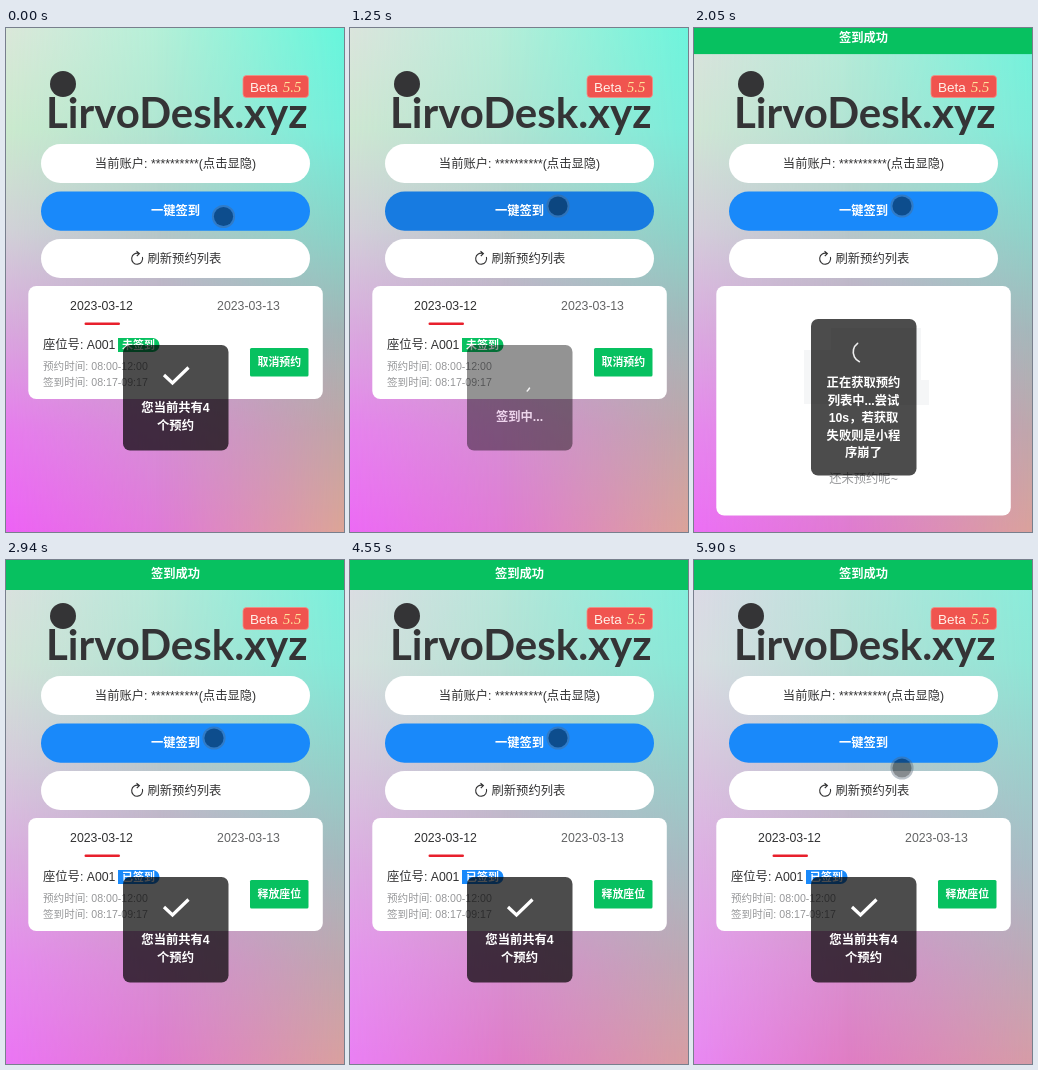
Write an HTML page that moves like this. It is 338 px wide and 504 px high and loops after 5.93 s.

```html
<!DOCTYPE html>
<html lang="zh-CN">
<head>
<meta charset="utf-8">
<title>签到</title>
<style>
  html, body { margin: 0; width: 100%; height: 100%; overflow: hidden; }
  div, svg { position: absolute; left: 0; top: 0; width: 338px; height: 504px; }
  #middle { -webkit-mask-image: linear-gradient(90deg, transparent, #000 45%); mask-image: linear-gradient(90deg, transparent, #000 45%); }
  #right { -webkit-mask-image: linear-gradient(90deg, transparent 45%, #000); mask-image: linear-gradient(90deg, transparent 45%, #000); }
  text { font: 12.3px "Liberation Sans", "Noto Sans CJK SC", "Noto Sans CJK", sans-serif; fill: #323233; white-space: pre; }
  .mid { text-anchor: middle; }
  .light { fill: #fff; font-weight: 700; }
  .soft { fill: #969799; }
  .small { font-size: 10.6px; }
  .brand { font: 700 42px Lato, sans-serif; fill: #343436; }
</style>
</head>
<body>
<div id="left"></div>
<div id="middle"></div>
<div id="right"></div>
<svg viewBox="0 0 338 504">
  <circle cx="57" cy="56" r="13" fill="#343436"/>
  <text class="brand" x="40" y="100">LirvoDesk.xyz</text>
  <rect x="237" y="47.5" width="65.5" height="22" rx="3.5" fill="#f0544f" stroke="#f58d84" stroke-width=".8"/>
  <text x="244" y="63.5" style="font-size:13.5px;fill:#fff0e8">Beta</text>
  <text x="277" y="64" style="font:italic 14.5px 'Liberation Serif',serif;fill:#ffe39a">5.5</text>

  <rect x="35" y="116" width="269" height="39" rx="19.5" fill="#fff"/>
  <text class="mid" x="169.5" y="139.5">当前账户: **********(点击显隐)</text>
  <rect id="sign" x="35" y="163.5" width="269" height="39.3" rx="19.6"/>
  <text class="mid light" x="169.5" y="187.3">一键签到</text>
  <rect x="35" y="211" width="269" height="39" rx="19.5" fill="#fff"/>
  <path d="M133 225.5A5.5 5.5 0 1 0 136.4 229M130.5 223.2L133.4 225.6L130.8 228" fill="none" stroke="#323233" stroke-width="1.1"/>
  <text x="141.5" y="234.7">刷新预约列表</text>

  <rect id="card" x="22.3" y="258" width="294.5" rx="8" fill="#fff"/>
  <g id="list">
    <text class="mid" x="95.5" y="282">2023-03-12</text>
    <text class="mid" x="242.5" y="282" style="fill:#646566">2023-03-13</text>
    <rect x="78.5" y="294.6" width="35.5" height="2.4" rx="1.2" fill="#e8202c"/>
    <text x="37" y="321.3">座位号: A001</text>
    <path id="tag" d="M112 310H146.5A7 7 0 0 1 146.5 324H112Z"/>
    <text id="tagText" class="light" x="116" y="321" style="font-size:11px"></text>
    <text class="soft small" x="37" y="342">预约时间: 08:00-12:00</text>
    <text class="soft small" x="37" y="358">签到时间: 08:17-09:17</text>
    <rect x="244" y="320" width="58.5" height="28.5" rx="1.5" fill="#07c160"/>
    <text id="action" class="mid light" x="273.3" y="338" style="font-size:10.9px"></text>
  </g>
  <g id="empty">
    <path d="M110 322H140V376H110ZM137 300H227V352H235V377H137Z" fill="#f5f6f7"/>
    <text class="mid soft" x="169.5" y="455">还未预约呢~</text>
  </g>

  <g id="toast">
    <rect id="box" x="117" width="105.5" rx="7" fill="#000" fill-opacity=".7"/>
    <path id="check" d="M158 347L166.5 355L182.5 339.5" fill="none" stroke="#fff" stroke-width="3.2"/>
    <circle id="spin" cx="170" r="10.8" fill="none" stroke="#eee" stroke-width="1.6" stroke-linecap="round"/>
    <g id="message"></g>
  </g>

  <g id="cursor">
    <circle r="10.6" fill="none" stroke="#567" stroke-opacity=".4" stroke-width="2"/>
    <circle r="9.6" fill="#000a14" fill-opacity=".47"/>
  </g>
  <g id="notify">
    <rect width="338" height="30" fill="#07c160"/>
    <text class="mid light" x="169.5" y="18.2">签到成功</text>
  </g>
</svg>
<script>
const LOOP = 5930, SIGNING = 1130, LOADING = 1700, DONE = 2330;
const $ = id => document.getElementById(id);
const set = (id, attrs) => { for (const k in attrs) $(id).setAttribute(k, attrs[k]); };
const show = (id, on) => $(id).style.display = on ? '' : 'none';
const progress = (t, start, length) => Math.min(1, Math.max(0, (t - start) / length));
const smooth = p => .5 - .5 * Math.cos(Math.PI * p);
const mix = (a, b, p) => a + (b - a) * p;

// Column colours from top to bottom, at the start and the end of the loop
const columns = {
  left: ['dbe8da cbeace d2d2d8 d9a8de e77cee ee62f6', 'ddd9e7 d9dde2 dac6e0 dfaee5 e69aee e988f4'],
  middle: ['b5f0d8 b0e6d2 b5c8c8 c6a8c8 d68ed6 e07ad8', 'b8e6dc b6e0d6 bcc8ce c8aac8 d890ce e07cc4'],
  right: ['66f6dc 74eedb 86d5c8 a2b5b5 c0a5a5 dca596', '88eedb 8ee6d6 9bd0cc a8bcc4 bea8b6 d69ca6']
};
const rgb = hex => [0, 2, 4].map(i => parseInt(hex.slice(i, i + 2), 16));
const palettes = Object.entries(columns).map(([id, ends]) => [id, ends.map(s => s.split(' ').map(rgb))]);

const toasts = {
  done: { top: 317, height: 105.5, first: 384, lines: ['您当前共有4', '个预约'] },
  signing: { top: 317, height: 105.5, first: 393, spin: 355, start: SIGNING, lines: ['签到中...'] },
  loading: { top: 291, height: 156.5, first: 359, spin: 324, start: LOADING,
    lines: ['正在获取预约', '列表中...尝试', '10s，若获取', '失败则是小程', '序崩了'] }
};
let phase;

function setPhase(name, signed) {
  const key = name + signed;
  if (key === phase) return;
  phase = key;
  const toast = toasts[name], empty = name === 'loading';
  set('box', { y: toast.top, height: toast.height });
  $('message').innerHTML = toast.lines.map((line, i) =>
    `<text class="mid light" x="169.5" y="${toast.first + i * 17.5}">${line}</text>`).join('');
  show('check', name === 'done');
  show('spin', name !== 'done');
  show('list', !empty);
  show('empty', empty);
  set('card', { height: empty ? 229.5 : 113 });
  set('tag', { fill: signed ? '#1989fa' : '#07c160' });
  $('tagText').textContent = signed ? '已签到' : '未签到';
  $('action').textContent = signed ? '释放座位' : '取消预约';
}

function spin(toast, t) {
  const age = t - toast.start, half = age % 1500 / 750, unit = .54;
  const grow = smooth(Math.min(half, 1)), leave = smooth(Math.max(half - 1, 0));
  set('spin', {
    cy: toast.spin,
    transform: `rotate(${age * .18} 170 ${toast.spin})`,
    'stroke-dasharray': `${mix(1, 90, grow) * unit} ${200 * unit}`,
    'stroke-dashoffset': -(40 * grow + 80 * leave) * unit
  });
}

function draw(t) {
  for (const [id, [from, to]] of palettes) {
    const stops = from.map((c, i) => `rgb(${c.map((v, k) => mix(v, to[i][k], t / LOOP))})`);
    $(id).style.background = `linear-gradient(${stops})`;
  }
  const name = t < SIGNING || t >= DONE ? 'done' : t < LOADING ? 'signing' : 'loading';
  setPhase(name, t >= LOADING);
  if (name !== 'done') spin(toasts[name], t);
  set('toast', { opacity: name === 'signing' ? progress(t, SIGNING, 200) : 1 });
  set('sign', { fill: t > 1060 && t < 1290 ? '#177be1' : '#1989fa' });

  const arrive = smooth(progress(t, 60, 500)), leave = smooth(progress(t, 5400, 470));
  set('cursor', { transform: `translate(${mix(217.5, 208, arrive)} ${mix(188.5, 178, arrive) + 30 * leave})` });
  set('notify', { transform: `translate(0 ${-30 * (1 - progress(t, 1840, 330)) ** 2})` });
  show('notify', t > 1840);
}

const begin = performance.now();
function tick() {
  draw((performance.now() - begin) % LOOP);
  requestAnimationFrame(tick);
}
tick();
</script>
</body>
</html>
```
